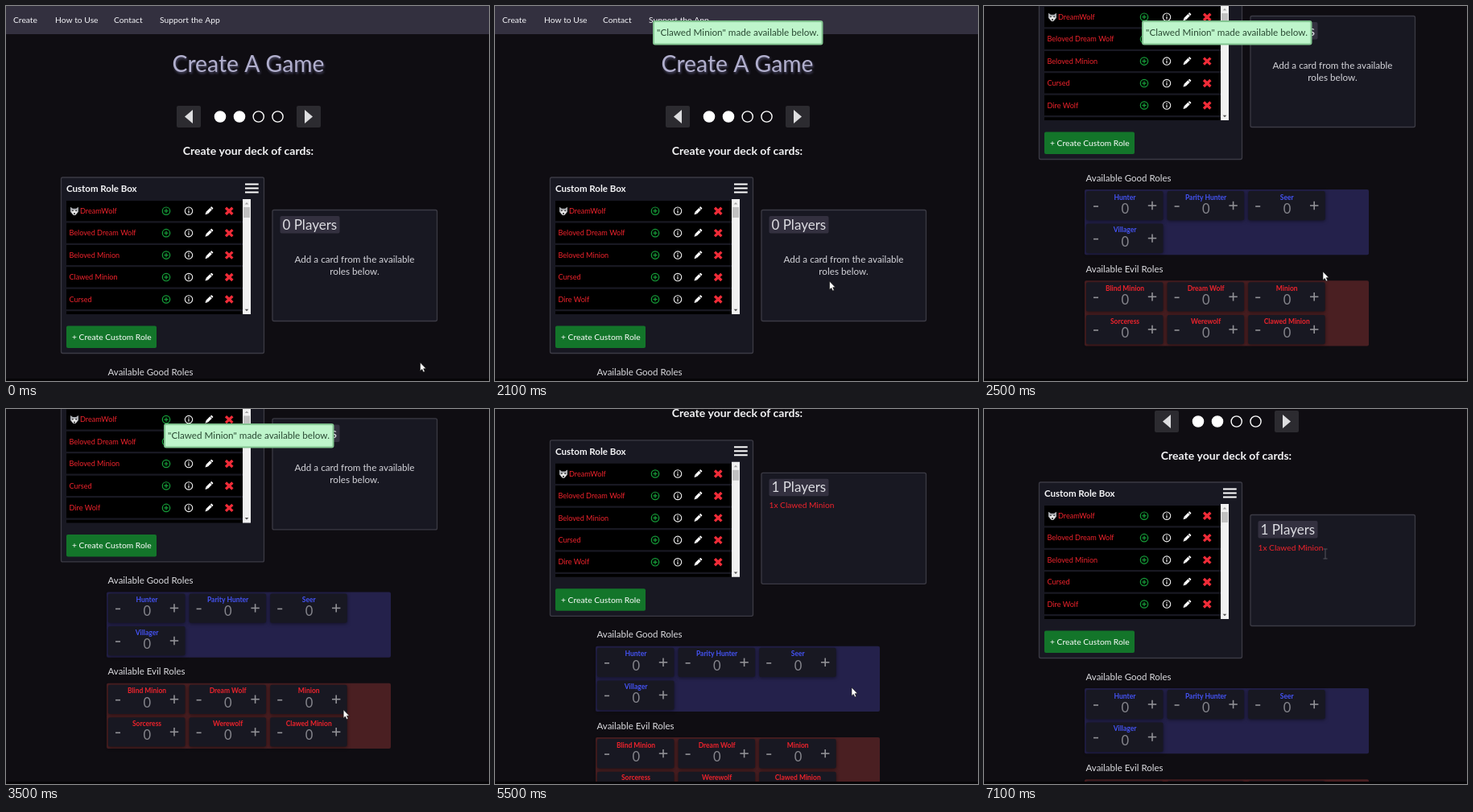
Write an HTML page with a canvas that moves like this. It is 600 by 466 pixels and loops after 7200 ms.

```html
<!DOCTYPE html>
<html lang="en">
<head>
<meta charset="utf-8">
<title>Create A Game</title>
<style>
html, body { margin: 0; width: 100%; height: 100%; overflow: hidden; background: #0f0d12; }
canvas { display: block; width: 100vw; height: 100vh; }
</style>
</head>
<body>
<canvas id="stage" width="600" height="466"></canvas>
<script>
const ctx = document.getElementById('stage').getContext('2d');
const LOOP = 7200, STEP = 100;
const CLICK_ADD = 1600, CLICK_PLUS = 4950;
const PANEL = '#181822', EDGE = '#3b3a44', RED = '#ef232c', GREEN = '#16a03a', BLUE = '#4453f4';

// Keys are [time, ...values], eased between neighbours.
const SCROLL = [[2150, 0], [2500, 241], [3100, 241.6], [5250, 241.6], [5700, 126], [5900, 122]];
const POINTER = [
  [200, 514.5, 443], [1000, 203, 337.5], [1650, 203, 337.5], [2050, 415.5, 342], [2200, 415.5, 342],
  [2500, 421, 330], [3100, 421, 330], [3800, 418, 402], [5000, 418, 402], [5500, 443, 346],
  [5800, 443, 346], [6300, 424, 180]
];

const ease = p => p * p * (3 - 2 * p);

function track(keys, t) {
  if (t <= keys[0][0]) return keys[0].slice(1);
  for (let i = 1; i < keys.length; i++) {
    const a = keys[i - 1], b = keys[i];
    if (t < b[0]) {
      const p = ease((t - a[0]) / (b[0] - a[0]));
      return a.slice(1).map((v, k) => v + (b[k + 1] - v) * p);
    }
  }
  return keys[keys.length - 1].slice(1);
}

const ramp = (t, from, to) => Math.min(1, Math.max(0, (t - from) / (to - from)));

function text(str, x, y, size, color, { align = 'left', weight = 400 } = {}) {
  ctx.font = `${weight} ${size}px Lato, sans-serif`;
  ctx.textAlign = align;
  ctx.fillStyle = color;
  ctx.fillText(str, x, y);
}

function box(x, y, w, h, fill, { edge, radius = 0, line = 1 } = {}) {
  ctx.beginPath();
  ctx.roundRect(x, y, w, h, radius);
  if (fill) { ctx.fillStyle = fill; ctx.fill(); }
  if (edge) { ctx.strokeStyle = edge; ctx.lineWidth = line; ctx.stroke(); }
}

function poly(points, fill, edge, line = 1) {
  ctx.beginPath();
  points.forEach(([x, y]) => ctx.lineTo(x, y));
  ctx.closePath();
  ctx.fillStyle = fill;
  ctx.fill();
  if (edge) { ctx.strokeStyle = edge; ctx.lineWidth = line; ctx.stroke(); }
}

function line(x1, y1, x2, y2, color, width) {
  ctx.beginPath();
  ctx.moveTo(x1, y1);
  ctx.lineTo(x2, y2);
  ctx.strokeStyle = color;
  ctx.lineWidth = width;
  ctx.stroke();
}

function plus(x, y, r, color, width) {
  line(x - r, y, x + r, y, color, width);
  line(x, y - r, x, y + r, color, width);
}

function circle(x, y, r, { fill, edge, width = 1 }) {
  ctx.beginPath();
  ctx.arc(x, y, r, 0, 7);
  if (fill) { ctx.fillStyle = fill; ctx.fill(); }
  if (edge) { ctx.strokeStyle = edge; ctx.lineWidth = width; ctx.stroke(); }
}

function at(x, y, draw) {
  ctx.save();
  ctx.translate(x, y);
  draw();
  ctx.restore();
}

function drawHeader() {
  box(0, 0, 600, 35, '#33303f');
  [['Create', 9], ['How to Use', 61], ['Contact', 134], ['Support the App', 191]]
    .forEach(([label, x]) => text(label, x, 20.5, 10.3, '#f4f4f8'));

  ctx.save();
  ctx.shadowColor = '#4c4a66';
  ctx.shadowOffsetX = 1;
  ctx.shadowOffsetY = 2;
  ctx.shadowBlur = 3;
  text('Create A Game', 301, 81.5, 28.3, '#b1afcd', { align: 'center' });
  ctx.restore();

  box(212, 124, 30, 27, '#2c2b30', { radius: 2 });
  box(361, 124, 30, 27, '#2c2b30', { radius: 2 });
  poly([[222, 137.5], [232, 129], [232, 146]], '#dedee0');
  poly([[381, 137.5], [371, 129], [371, 146]], '#dedee0');
  [266, 290, 313.7, 337.5].forEach((x, i) =>
    circle(x, 137.5, 6.6, { fill: i < 2 && '#fff', edge: '#fff', width: 1.4 }));
  text('Create your deck of cards:', 301, 184.5, 14, '#f4f4f6', { align: 'center', weight: 700 });
}

function drawWolf(x, y) {
  at(x, y, () => {
    poly([[-5, -5], [-2, -3], [2, -3], [5, -5], [5, 1], [1.5, 5], [-1.5, 5], [-5, 1]], '#a9acb0');
    poly([[-4, 1], [0, -1], [4, 1], [1, 5], [-1, 5]], '#e6e6e6');
    box(-2.8, -1, 1.4, 1.4, '#222');
    box(1.4, -1, 1.4, 1.4, '#222');
    box(-1, 2.6, 2, 1.5, '#222');
  });
}

function drawPencil(x, y) {
  at(x, y, () => {
    ctx.rotate(Math.PI / 4);
    box(-1.7, -6.2, 3.4, 2, '#fff', { radius: 0.7 });
    box(-1.7, -3.6, 3.4, 6.8, '#fff');
    poly([[-1.7, 3.2], [1.7, 3.2], [0, 6.4]], '#fff');
  });
}

function drawRow(name, y, hovered) {
  box(75, y - 12.7, 219, 25.2, '#000', hovered ? { edge: '#d9ddd8', radius: 1 } : {});
  const wolf = name === 'DreamWolf';
  if (wolf) drawWolf(85, y);
  text(name, wolf ? 92 : 78.5, y + 3.2, 9.1, RED);
  if (hovered) box(190, y - 9, 18, 18, '#35353a', { radius: 2 });
  circle(199, y, 4.7, { edge: GREEN, width: 1.2 });
  plus(199, y, 2.6, GREEN, 1.2);
  circle(227, y, 4.7, { edge: '#f2f2f2', width: 1.1 });
  line(227, y - 0.8, 227, y + 2.7, '#f2f2f2', 1.2);
  line(227, y - 2.8, 227, y - 1.6, '#f2f2f2', 1.2);
  drawPencil(252, y);
  line(273, y - 4, 281.4, y + 4, '#f02c38', 3.3);
  line(281.4, y - 4, 273, y + 4, '#f02c38', 3.3);
}

function drawRoleBox(t, pointerX, pointerY) {
  box(68.5, 213, 252, 218.5, PANEL, { edge: EDGE, radius: 2, line: 1.3 });
  text('Custom Role Box', 75, 231, 11.5, '#f6f6f8', { weight: 700 });
  [221.5, 226.5, 231.5].forEach(y => line(297, y, 313.7, y, '#fff', 2));

  const names = ['DreamWolf', 'Beloved Dream Wolf', 'Beloved Minion', 'Clawed Minion', 'Cursed', 'Dire Wolf', ''];
  if (t >= CLICK_ADD) names.splice(3, 1);
  ctx.save();
  ctx.beginPath();
  ctx.rect(74, 240, 221, 143);
  ctx.clip();
  names.slice(0, 6).forEach((name, i) => {
    const y = 254.7 + i * 27.45;
    const hovered = pointerX > 75 && pointerX < 294 && Math.abs(pointerY - y) < 12.7;
    drawRow(name, y, hovered);
  });
  ctx.restore();

  box(294, 240, 10, 143, '#f1f1f1');
  box(295, 250, 8, 13, '#c1c1c1');
  poly([[296.7, 246.5], [301.3, 246.5], [299, 244]], '#a3a3a3');
  poly([[296.7, 376.7], [301.3, 376.7], [299, 379.2]], '#505050');
  box(75, 397.5, 112, 27.5, '#13752a', { radius: 2 });
  text('+ Create Custom Role', 82, 415, 10.3, '#fff');
}

function drawPlayers(chosen) {
  box(331, 253.5, 204.5, 138, PANEL, { edge: EDGE, radius: 2, line: 1.3 });
  box(340.5, 261, 74, 21.5, '#33303f', { radius: 2 });
  text(`${chosen} Players`, 343.5, 277.7, 17, '#dddde2');
  if (chosen) {
    text('1x Clawed Minion', 340.5, 297.7, 10.2, RED);
  } else {
    text('Add a card from the available', 433, 319, 11.7, '#d4d4da', { align: 'center' });
    text('roles below.', 433, 333.7, 11.7, '#d4d4da', { align: 'center' });
  }
}

function drawRoles(title, top, names, back, color, counts = {}) {
  text(title, 126.5, top - 10.3, 11.5, '#dcdce0');
  box(125, top, 353, 81.3, back, { radius: 2 });
  names.forEach((name, i) => {
    const x = 127 + (i % 3) * 100.6, y = top + 2 + Math.floor(i / 3) * 40.6;
    ctx.save();
    ctx.shadowColor = 'rgba(0,0,0,.5)';
    ctx.shadowBlur = 4;
    ctx.shadowOffsetY = 1;
    box(x, y, 95.5, 36.3, PANEL, { radius: 2 });
    ctx.restore();
    text(name, x + 48, y + 10.6, 8.5, color, { align: 'center', weight: 700 });
    text(counts[name] || 0, x + 48.3, y + 28, 16.5, '#85858c', { align: 'center' });
    line(x + 9, y + 19, x + 15, y + 19, '#919196', 1.6);
    plus(x + 82, y + 18, 5.2, '#919196', 1.6);
  });
}

function drawToast(alpha) {
  if (alpha <= 0) return;
  ctx.save();
  ctx.globalAlpha = alpha;
  box(197, 19, 209.5, 28.5, '#bef5cb', { edge: '#82c490', radius: 2, line: 2 });
  text('"Clawed Minion" made available below.', 301.5, 37.3, 11.7, '#2a4a33', { align: 'center' });
  ctx.restore();
}

const cursors = {
  arrow() {
    poly([[0, 0], [0, 10.5], [2.3, 8.4], [4, 12], [5.8, 11.2], [4.2, 7.7], [7.3, 7.6]], '#fff', '#111', 0.6);
  },
  hand() {
    poly([[-1, 0.6], [0, 0], [1, 0.6], [1.2, 4.4], [3, 4.6], [4.6, 5.2], [6.2, 6], [6.4, 9.5],
      [5, 13.5], [-0.4, 13.5], [-2.4, 10.6], [-4, 7.6], [-3, 7], [-1.2, 8.6]], '#fff', '#111', 0.7);
    [1.4, 3.1, 4.7].forEach(x => line(x, 5.5, x, 7.6, '#222', 0.6));
  },
  beam() {
    line(0, -6, 0, 6, '#55555c', 1);
    line(-2.5, -6, 2.5, -6, '#55555c', 1);
    line(-2.5, 6, 2.5, 6, '#55555c', 1);
  }
};

function cursorKind(t) {
  if (t >= 6250) return 'beam';
  const onAdd = t >= 950 && t < 1700, onPlus = t >= 3700 && t < 5100;
  return onAdd || onPlus ? 'hand' : 'arrow';
}

function render(t) {
  const [scroll] = track(SCROLL, t);
  const [x, y] = track(POINTER, t);
  const chosen = t >= CLICK_PLUS ? 1 : 0;
  const evil = ['Blind Minion', 'Dream Wolf', 'Minion', 'Sorceress', 'Werewolf'];
  if (t >= CLICK_ADD) evil.push('Clawed Minion');

  box(0, 0, 600, 466, '#0f0d12');
  at(0, -scroll, () => {
    drawHeader();
    drawRoleBox(t, x, y + scroll);
    drawPlayers(chosen);
    drawRoles('Available Good Roles', 469, ['Hunter', 'Parity Hunter', 'Seer', 'Villager'], '#24214b', BLUE);
    drawRoles('Available Evil Roles', 582.3, evil, '#4a1f22', RED, { 'Clawed Minion': chosen });
  });
  drawToast(ramp(t, CLICK_ADD - 100, CLICK_ADD + 200) * (1 - ramp(t, 5000, 5400)));
  at(x, y, cursors[cursorKind(t)]);
  box(0, 463, 600, 3, '#060507');
}

function frame() {
  const t = performance.now() % LOOP;
  render(Math.floor(t / STEP) * STEP);
  requestAnimationFrame(frame);
}
frame();
</script>
</body>
</html>
```
